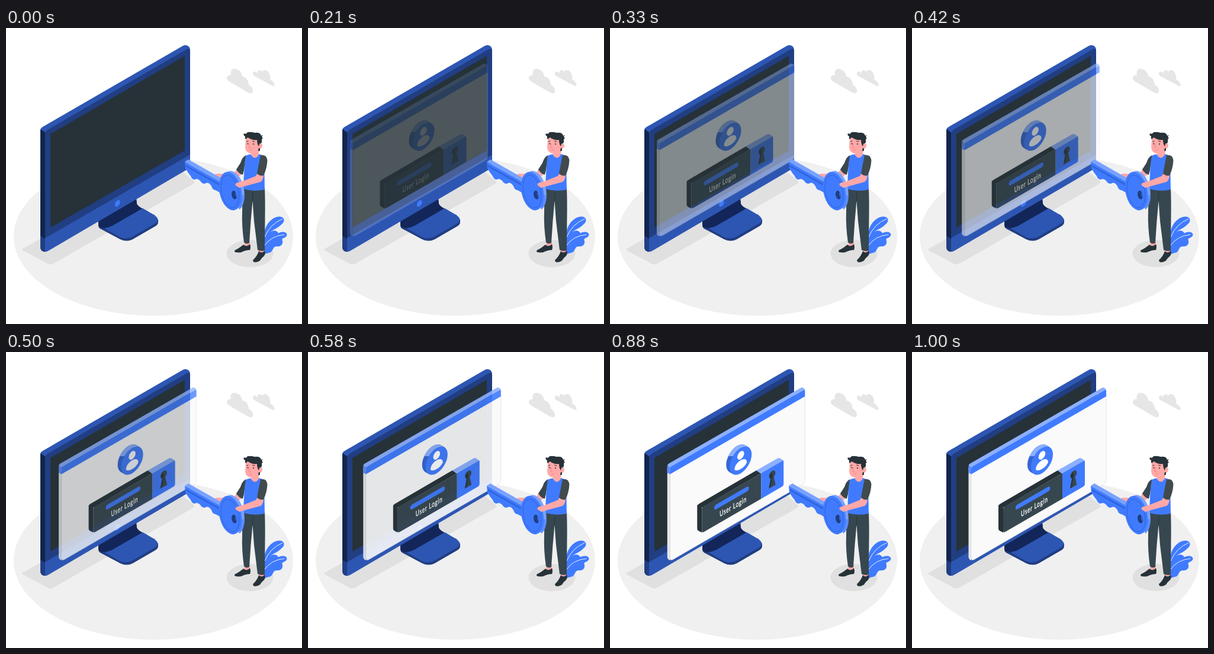
Recreate the animation shown at these times as an HTML page. Size 500 by 500 pixels, loop 1.04 s.

```html
<!DOCTYPE html>
<html lang="en">
<head>
<meta charset="utf-8">
<title>User login</title>
<style>
html, body { margin: 0; width: 100%; height: 100%; overflow: hidden; background: #fff; }
svg { display: block; width: 100vw; height: 100vh; }
.blue { fill: #407bff; }
.pale { fill: #8cb0ff; }
.mid { fill: #2d56b3; }
.deep { fill: #213e82; }
.navy { fill: #13265a; }
.slate { fill: #37474f; }
.ink { fill: #263238; }
.skin { fill: #ffa8a7; }
.line { fill: none; stroke-linecap: round; stroke-linejoin: round; }
text { font: 13px Lato, "Open Sans", sans-serif; letter-spacing: 1px; fill: #fff; }
</style>
</head>
<body>
<svg viewBox="0 0 500 500">
  <defs>
    <clipPath id="upper"><path d="M190 140H250V176H190Z"/></clipPath>
    <g id="rim">
      <circle r="21.400" transform="matrix(.866 -.5 0 1 213.500 180)"/>
      <path d="M200.400 202.700L226.600 157.300L232.600 160.800L206.400 206.200Z"/>
    </g>
  </defs>

  <!-- floor and clouds -->
  <ellipse cx="249" cy="352" rx="236" ry="134" fill="#f0f0f0"/>
  <path d="M28 373L282 229L318 259Q319 262 315 264L80 398Q75 401 70 398L29 376Q26 375 28 373Z" fill="#e0e0e0"/>
  <ellipse cx="412" cy="381" rx="39.5" ry="23" fill="#e0e0e0"/>
  <g fill="#e6e6e6">
    <path d="M373 85C373 80 377 79 380 80C378 73 382 68 387 69C395 70 399 77 399 82C405 82 410 89 410 96C415 98 418 104 417 108C416 111 413 111 409 109L378 91Q373 88 373 85Z"/>
    <path d="M417 77C417 73 421 72 425 77C424 71 429 70 433 74C434 70 440 70 443 74C446 78 447 84 446 87C451 89 454 94 453.500 97C453 99 450 98 447 96L421 82Q417 80 417 77Z"/>
  </g>

  <!-- monitor -->
  <path class="navy" d="M156 326L220 288L221 297Q222 301 234 307L176 341L164 341Q156 339 156 333Z"/>
  <path class="deep" d="M158 335L176 336L250 315L257 324V328Q257 332 252 335L214 357Q204 362 193 357L163 341Q158 338 158 335Z"/>
  <path class="navy" d="M156 326L220 288L221 297Q222 301 234 307L176 341L164 338Q156 337 156 332Z"/>
  <path class="mid" d="M166 338Q176 337 185 331L231 304.500L249 315Q262 323 252 330L214 352Q204 358 192 353Z"/>
  <path class="mid" d="M58 173Q58 169 62 167L299 30Q303 28 307 30Q311 32 311 38L300 60L70 190Z"/>
  <path d="M58 171L66 176V378Q58 377 58 370Z" fill="#13254d"/>
  <path class="deep" d="M58 351L66 356V378Q58 377 58 370Z"/>
  <path class="deep" d="M66 180Q66 175 70 172L305 36Q311 33 311 39V230L66 370Z"/>
  <path class="mid" d="M66 355L311 214V229Q311 235 306 239L73 375.500Q69 378 66 378Z"/>
  <path class="ink" d="M75 179L302 47V207L75 337Z"/>
  <circle class="blue" r="5" transform="matrix(.866 -.5 0 1 188.300 296.300)"/>

  <!-- floating window -->
  <g id="panel" opacity="0">
    <path d="M95.500 195L100 196V352Q95.500 350 95.500 346Z" fill="#e8e8e8"/>
    <path d="M100 196L328 65V217Q328 221 323.500 224L105 350.500Q100 353 100 348Z" fill="#fafafa" stroke="#dcdfe6" stroke-width=".8"/>
    <path class="pale" d="M95.500 192Q95.500 190 98 188.500L321 60.500Q323 59.500 325 60.500L328 63L101 196Z"/>
    <path d="M95.500 192L100 195V206.500L95.500 204Z" fill="#5b8dff"/>
    <path class="blue" d="M100 197Q100 195 102 193.500L325.500 64.500Q328 63 328 65V75L100 206.500Z"/>

    <use href="#rim" fill="#3466d4"/>
    <use href="#rim" class="pale" clip-path="url(#upper)"/>
    <g transform="matrix(.866 -.5 0 1 219.500 183.500)">
      <circle class="blue" r="21.400"/>
      <circle cy="-9" r="6.700" fill="#fff"/>
      <path d="M-12 9C-12 -4 12 -4 12 9C8 16 -8 16 -12 9Z" fill="#fff"/>
    </g>

    <path class="ink" d="M146 259L149 256.500L246 200L254 205L154 263Z"/>
    <path class="pale" d="M246 200L282 179.500Q284 178.500 286 179.500L292 183.500L254 206Z"/>
    <path class="ink" d="M146 260Q146 258 148 259L154 263V305L149 302.500Q146 301 146 298Z"/>
    <path class="slate" d="M154 265Q154 263 156 261.500L254 205V248L158 303.500Q154 306 154 302Z"/>
    <path class="blue" d="M254 205L290 184Q292 183 292 185V223Q292 225.500 290 227L254 248Z"/>
    <path class="line" d="M0 0H59.500" stroke="#407bff" stroke-width="8" transform="matrix(.866 -.5 0 1 178.300 261.500)"/>
    <text transform="matrix(.65 -.375 0 1 184 278.500)" stroke="#fff" stroke-width=".4">User Login</text>
    <g transform="matrix(.866 -.5 0 1 272.800 208.500)">
      <path class="slate" d="M-3 4A6.300 6.300 0 1 1 3 4L6.500 19H-6.500Z"/>
      <path class="ink" d="M-3 4A6.300 6.300 0 0 1 -2 -6Q2 -1 -1 5L-3 17L-6.500 19Z"/>
    </g>
  </g>

  <!-- plant -->
  <path class="blue" d="M436 350C437 332 449 319 462 318.500C471 319 472 327 465 332C460 338 451 340 446 345C453 340 458 343 460 346.500C466 343 475 344 474.500 350C473 355 466 354 466.500 358C469 364 465 370 457 369C451 369 452 375 447 379L436 382Z"/>
  <path class="line" d="M437 353Q446 331 467 322.500M437 367Q448 351 470 349" stroke="#fff" stroke-width=".9"/>

  <!-- legs -->
  <path class="skin" d="M403 360H412V370H402ZM427 374H437V382H427Z"/>
  <path class="ink" d="M387 375Q391 374 401 366Q407 371 412 365Q414 370 412 375Q405 375 397 379Q386 380 386 377ZM417 392Q424 386 427 377Q433 382 437 376Q439 381 436 385Q431 389 429 393Q423 397 418 395Z"/>
  <path class="slate" d="M399.500 270H437Q438 292 437.500 322L437 376Q431 378 425 375L419 326L416.500 292L413.500 326L411 363Q406 366 402 362Q398 335 399 310Z"/>
  <path class="line" d="M417 278L416.500 292" stroke="#263238" stroke-width="1"/>

  <!-- far arm -->
  <path class="skin" d="M391 236L384 247L358 246Q352 246 353 250L366 256L387 257L400 245Z"/>

  <!-- torso -->
  <path class="blue" d="M404 216Q410 213 416 213H428L436 216L437 273Q420 277 401 272L402 245Z"/>
  <path class="slate" d="M405 215Q399 218 396 228L389 239Q393 246 400 248L402 240Z"/>
  <path class="skin" d="M414 203L428 201L427 214Q421 224 414 215Z"/>

  <!-- key -->
  <path class="blue" d="M302 226L363 260V279Q358 276 354 274Q349 274 347 267Q342 260 338 262Q332 265 328 258Q323 253 319 256Q314 256 312 250L308 245L303 237Z"/>
  <path d="M303 231L362 264V267L304 234.500Z" fill="#2f63dc"/>
  <path d="M302 226L308 222L367 255.500L362 260Z" fill="#79a2ff"/>
  <ellipse cx="384" cy="273.500" rx="18" ry="32.500" fill="#79a2ff" transform="rotate(-12 384 273.500)"/>
  <path d="M394 307Q403 300 403 282L392 284Z" fill="#5b8dff"/>
  <ellipse cx="379" cy="275.500" rx="18.500" ry="33" class="blue" transform="rotate(-12 379 275.500)"/>
  <ellipse cx="378.500" cy="276" rx="14.500" ry="28" class="line" stroke="#2f63dc" stroke-width="1" transform="rotate(-12 378.500 276)"/>
  <ellipse cx="385.500" cy="282" rx="4.300" ry="7.500" fill="#213e82" transform="rotate(-12 385.500 282)"/>
  <path d="M387.500 277Q390.500 281 389 286Q387 282 387.500 277Z" class="blue"/>

  <!-- near arm -->
  <path class="skin" d="M425 245L422 250L402 258L392 261Q386 262 388 266L394 270L404 267L430 260Q435 257 435 246Z"/>
  <path d="M430 215Q440 213 441.500 223Q441 237 435 249Q430 251 424 246L427 230Z" fill="#414b4d"/>

  <!-- head -->
  <path class="skin" d="M405 187Q414 180 427 188L428 196Q433 193 433 199Q432 205 427 204Q424 211 414 212Q405 211 404 202Z"/>
  <path class="ink" d="M405 188Q403 186 404 183Q400 181 402 178Q406 180 408 176Q414 175 420 177Q430 176 431 182L434 181L432 184L434 186L432 188Q433 192 431 195Q428 194 427 200Q424 196 424 189Q415 190 409 185Q407 185 405 188ZM427 203L429 203V207Q427 209 426 207Z"/>
  <path class="line" d="M406.500 192L409 191M416.500 191L420 192" stroke="#263238" stroke-width="1"/>
  <circle class="ink" cx="408.500" cy="195.500" r="1.100"/>
  <circle class="ink" cx="418" cy="196" r="1.100"/>
  <path class="line" d="M411 196L410 202L413 202.500M411 207Q414 207 416 205" stroke="#ed7b7b" stroke-width=".8"/>
</svg>
<script>
const LOOP = 1040, FPS = 24;
// [step, shift, opacity]
const KEYS = [
  [0, -30, 0], [1, -30, 0], [2, -29.2, .02], [3, -28, .06], [5, -24.5, .18],
  [8, -16.5, .44], [10, -11.3, .61], [12, -6.4, .77], [14, -2.2, .9],
  [16, .8, .98], [17, 1.6, 1], [18, 2, 1], [20, 1.7, 1], [24, 0, 1]
];
const panel = document.getElementById("panel");

function pose(step) {
  const i = Math.max(1, KEYS.findIndex(k => k[0] >= step));
  const a = KEYS[i - 1], b = KEYS[i];
  const u = (step - a[0]) / (b[0] - a[0]);
  return [1, 2].map(j => a[j] + (b[j] - a[j]) * u);
}

function stepAt(t) {
  let n = 24;
  while (n > 0 && Math.round(n * 100 / FPS) * 10 > t) n--;
  return n;
}

function draw() {
  const [x, alpha] = pose(stepAt(performance.now() % LOOP));
  panel.setAttribute("transform", `translate(${x} 0)`);
  panel.setAttribute("opacity", alpha);
  requestAnimationFrame(draw);
}
draw();
</script>
</body>
</html>
```
